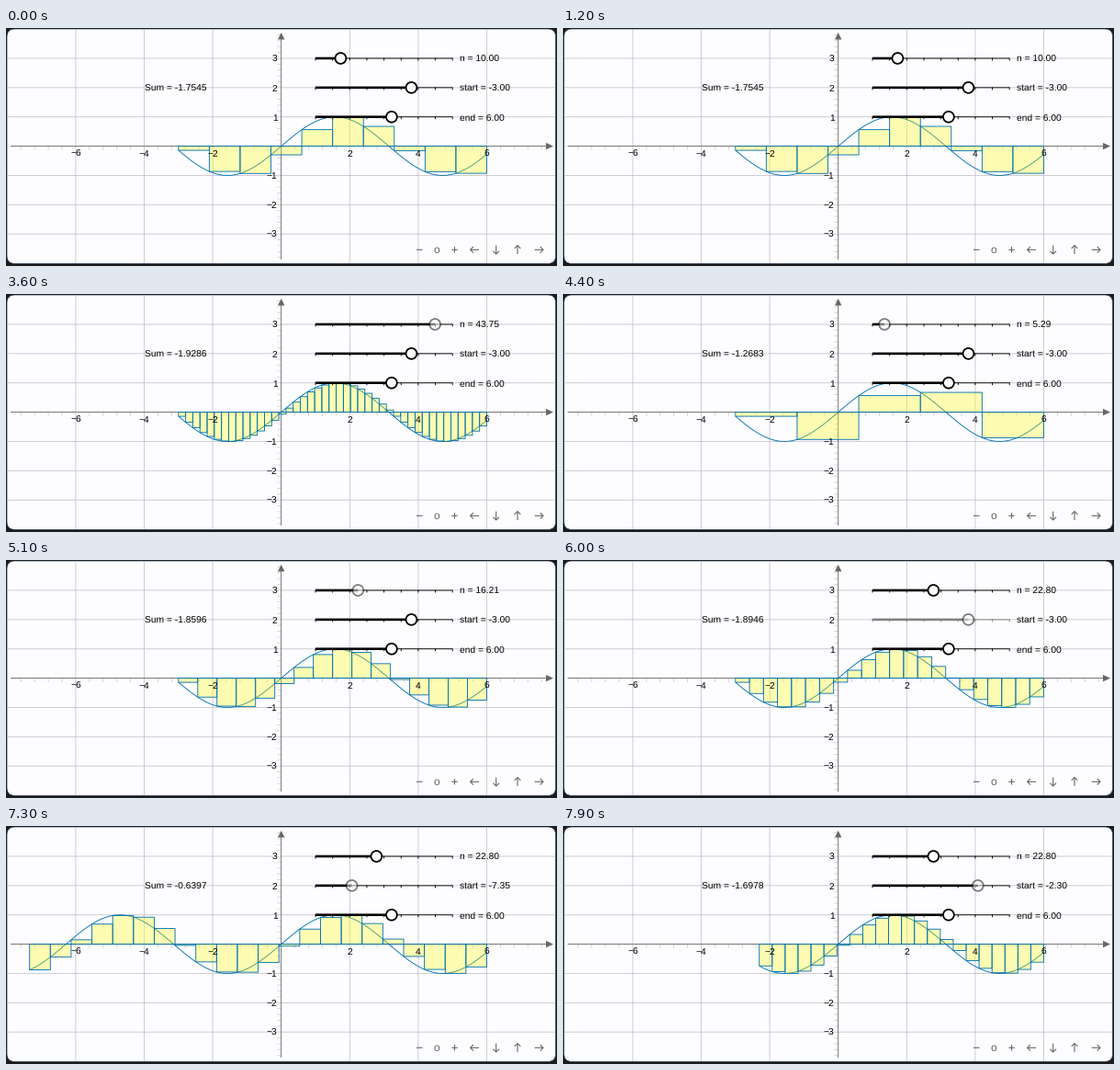
A matplotlib script that plays this animation: 600x259 px, repeating every 8 s.

```python
import matplotlib.pyplot as plt
import numpy as np
from matplotlib.animation import FuncAnimation
from matplotlib.collections import LineCollection, PolyCollection
from matplotlib.patches import Circle, FancyBboxPatch, Polygon

W, H, DPI = 600, 259, 100
STEP, FRAMES = 100, 80
PT = 72 / DPI                      # points per pixel
OX, OY, UX, UY = 299.7, 128.6, 37.3, 31.87
BLUE, AXIS, NAV = "#0072b2", "#666666", "#666666"

plt.rcParams.update({
    "font.family": "Liberation Sans",
    "text.hinting": "none",
    "path.snap": False,            # keep sub-pixel positions
})
fig = plt.figure(figsize=(W / DPI, H / DPI), dpi=DPI, facecolor="#1c1c1c")
ax = fig.add_axes([0, 0, 1, 1])
ax.set_xlim(0, W)
ax.set_ylim(H, 0)
ax.axis("off")


def px(x):
    return OX + UX * np.asarray(x)


def py(y):
    return OY - UY * np.asarray(y)


def line(xs, ys, color="black", width=0.9, z=1, **kw):
    kw.setdefault("solid_capstyle", "butt")
    return ax.plot(xs, ys, color=color, lw=width * PT, zorder=z, **kw)[0]


def segments(segs, color, width, z, alpha=1):
    item = LineCollection(segs, colors=color, linewidths=width * PT,
                          alpha=alpha, zorder=z)
    ax.add_collection(item)
    return item


def label(x, y, text, ha="left", size=10.2, color="black"):
    """Text whose digits are vertically centred on y."""
    return ax.text(x, y + 0.39 * size, text, ha=ha, va="baseline",
                   fontsize=size * PT, color=color, zorder=20)


def number(v):
    return str(v).replace("-", "\u2212")


def draw_board():
    ax.add_patch(FancyBboxPatch(
        (1, 1), 597.6, 255.4, boxstyle="round,pad=0,rounding_size=8.5",
        fc="#fdfcff", ec="#23364f", lw=0.7 * PT, zorder=0))
    xs, ys = (-6, -4, -2, 2, 4, 6), (-3, -2, -1, 1, 2, 3)
    grid = [[(px(x), 1.5), (px(x), 256)] for x in xs]
    grid += [[(1.5, py(y)), (598, py(y))] for y in ys]
    segments(grid, "#b8b8be", 0.9, 1, 0.75)

    minor = [[(px(k * 0.4), OY), (px(k * 0.4), OY + 4.3)]
             for k in range(-19, 20) if k % 5]
    minor += [[(OX - 4.3, py(k * 0.2)), (OX, py(k * 0.2))]
              for k in range(-19, 20) if k % 5]
    segments(minor, AXIS, 0.85, 2, 0.3)

    line([5, 590], [OY, OY], AXIS, 0.9, 2)
    line([OX, OX], [252, 10], AXIS, 0.9, 2)
    for tip in ([(596, OY), (588, OY - 3.7), (588, OY + 3.7)],
                [(OX, 5), (OX - 3.7, 12.5), (OX + 3.7, 12.5)]):
        ax.add_patch(Polygon(tip, fc=AXIS, ec="none", zorder=2))

    for x in xs:
        label(px(x), 136.3, number(x), "center")
    for y in ys:
        label(295.6, py(y), number(y), "right")


def draw_arrow(cx, cy, dx, dy, reach=4.7, head=3.3):
    tx, ty = cx + dx * reach, cy + dy * reach
    line([cx - dx * reach, tx], [cy - dy * reach, ty], NAV, 1.1, 20)
    bx, by = tx - dx * head, ty - dy * head
    line([bx - dy * head, tx, bx + dy * head],
         [by - dx * head, ty, by + dx * head], NAV, 1.1, 20)


def draw_navigation():
    y = 241.3
    line([447, 453.5], [y, y], NAV, 1.1, 20)
    label(469.2, y - 1, "o", "center", 12, NAV)
    line([485.3, 491.7], [y, y], NAV, 1.1, 20)
    line([488.5, 488.5], [y - 3.2, y + 3.2], NAV, 1.1, 20)
    for x, dx, dy in ((510.3, -1, 0), (533.7, 0, 1),
                      (557, 0, -1), (580.3, 1, 0)):
        draw_arrow(x, y, dx, dy)


class Slider:
    """Horizontal slider from x = 1 to x = 5 with a round handle."""

    def __init__(self, y, name, low, high):
        self.name, self.low, self.high = name, low, high
        x0, x1, yy = px(1), px(5), float(py(y))
        self.x0, self.y = x0, yy
        self.base = line([x0, x1], [yy, yy], width=0.9, z=10)
        ticks = [[(x, yy - 0.4), (x, yy + 2.5)]
                 for x in np.linspace(x0, x1, 9)]
        self.ticks = segments(ticks, "black", 0.9, 10)
        self.track = line([x0, x0], [yy, yy], width=2.6, z=11)
        self.knob = Circle((x0, yy), 5.9, lw=1.8 * PT, zorder=12)
        ax.add_patch(self.knob)
        self.text = label(494, yy, "")

    def show(self, value, knob_lit=False, track_lit=False):
        x = px(1 + 4 * (value - self.low) / (self.high - self.low))
        self.track.set_xdata([self.x0, x])
        self.knob.center = (x, self.y)
        alpha = 0.5 if knob_lit else 1
        self.knob.set_facecolor((1, 1, 1, alpha))
        self.knob.set_edgecolor((0, 0, 0, alpha))
        for part in (self.base, self.track, self.ticks):
            part.set_color("#808080" if track_lit else "black")
        self.text.set_text(f"{self.name} = {value:.2f}")


def glide(t, keys):
    """Ease smoothly from one (time, value) key to the next."""
    if t <= keys[0][0]:
        return keys[0][1]
    for (t0, v0), (t1, v1) in zip(keys, keys[1:]):
        if t <= t1:
            u = (t - t0) / (t1 - t0)
            return v0 + (v1 - v0) * u * u * (3 - 2 * u)
    return keys[-1][1]


N_KEYS = [(2700, 10), (3600, 43.75), (4400, 5.29), (5600, 22.8)]
START_KEYS = [(6100, -3), (7100, -8.28), (7900, -2.3045)]
END = 6.0

draw_board()
draw_navigation()
curve = line([], [], BLUE, 0.9, 4)
bars = PolyCollection([], facecolors=(1, 1, 0, 0.3), edgecolors=BLUE,
                      linewidths=0.9 * PT, zorder=5)
ax.add_collection(bars)
sum_text = label(150.7, py(2), "")
n_slider = Slider(3, "n", 1, 50)
start_slider = Slider(2, "start", -10, 0)
end_slider = Slider(1, "end", 1, 10)


def update(i):
    t = i * STEP
    n, start = glide(t, N_KEYS), glide(t, START_KEYS)

    n_slider.show(n, 2600 <= t < 5800)
    start_slider.show(start, t >= 6000, 6000 <= t < 6200)
    end_hover = 1900 <= t < 2000
    end_slider.show(END, end_hover, end_hover)

    xs = np.linspace(start, END, 400)
    curve.set_data(px(xs), py(np.sin(xs)))

    # left Riemann sum
    edges = np.linspace(start, END, int(n) + 1)
    heights = np.sin(edges[:-1])
    sides, tops = px(edges), py(heights)
    bars.set_verts([[(a, OY), (a, y), (b, y), (b, OY)]
                    for a, b, y in zip(sides, sides[1:], tops)])
    total = heights.sum() * (edges[1] - edges[0])
    sum_text.set_text(f"Sum = {total:.4f}")
    return []


anim = FuncAnimation(fig, update, frames=FRAMES, interval=STEP,
                     init_func=lambda: update(0), repeat=True, repeat_delay=0)
plt.show()
```
